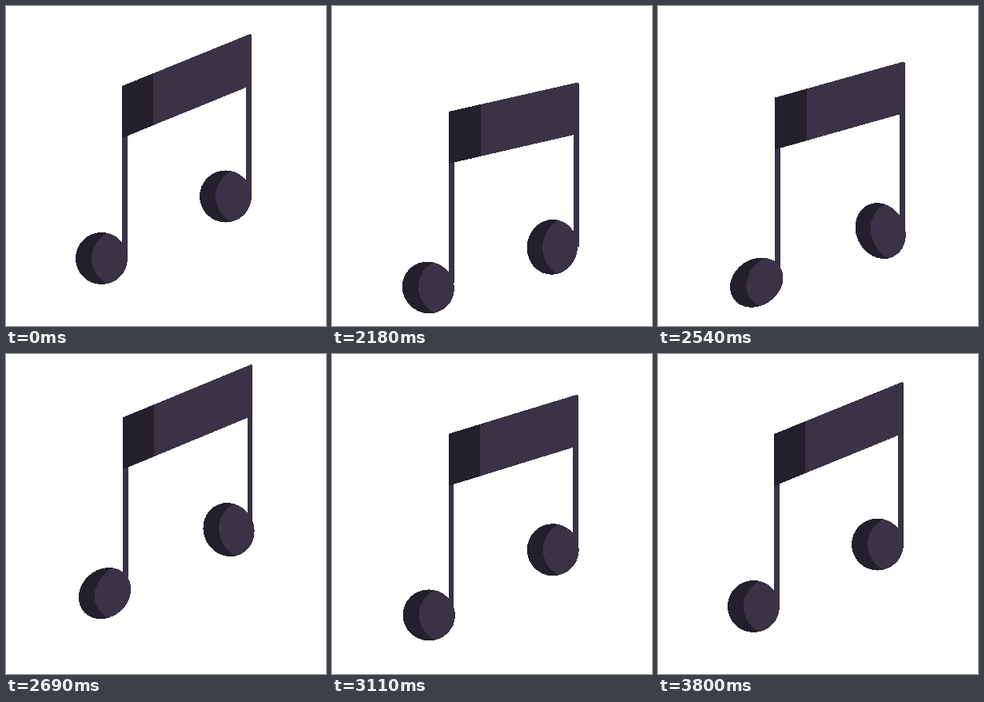
An HTML page that plays this animation: 400 px wide and 400 px high, repeating every 3830 ms.

```html
<!DOCTYPE html>
<html>
<head>
<meta charset="utf-8">
<style>
html, body { margin: 0; height: 100%; overflow: hidden; background: #fff; }
svg { display: block; width: 400px; height: 400px; fill: #393345; }
.dark { fill: #231f2b; }
</style>
</head>
<body>
<svg viewBox="0 0 400 400" shape-rendering="crispEdges">
  <defs>
    <g id="ball">
      <circle class="dark" r="32.5"/>
      <path d="M7.5-31.6A35 35 0 0 0 7.5 31.6A32.5 32.5 0 0 0 7.5-31.6Z"/>
    </g>
  </defs>
  <path id="stems"/>
  <path id="beam"/>
  <path id="shade" class="dark"/>
  <use id="head1" href="#ball"/>
  <use id="head2" href="#ball"/>
</svg>
<script>
const LOOP = 3830, START = 2030, STEP = 30, BOUNCE = 2000;
const STEM = 6.7;
const turns = [0, 250, 400, 720, 1050, 1330, 1650];
const $ = id => document.getElementById(id);
const ease = u => (1 - Math.cos(Math.PI * u)) / 2;

// Fall and hang, fly up, dip, hop, settle; a larger lag makes the part trail behind
const bounce = (lag, fall, fly, dip, hop) => time => {
  const t = time / lag, y = [0, fall, fall, fly, dip, hop, 0];
  const i = turns.findIndex(turn => turn > t);
  if (i < 1) return 0;
  const u = (t - turns[i - 1]) / (turns[i] - turns[i - 1]);
  return y[i - 1] + (y[i] - y[i - 1]) * ease(u);
};

const beamLeft = bounce(1, 39, -22, 1, -10);
const beamRight = bounce(1, 74, -24, 19, -10);
const head1 = bounce(1.07, 48, -26, 11, -4);
const head2 = bounce(1.02, 79, -23, 7, 1);
const sway = bounce(1, 1.9, 1.2, .8, .4);

const speed = (move, t) => (move(t + 5) - move(t - 5)) / 10;

function place(id, x, y, stretch, skew) {
  const wide = 1 - (stretch - 1) * .4;
  $(id).setAttribute('transform', `matrix(${wide} ${skew} ${skew} ${stretch} ${x} ${y})`);
}

function draw(t) {
  const s = sway(t);
  const left = 145.1 + s * .75, right = 307 + s * 1.1, split = 184 + s;
  const yl = 100 + beamLeft(t), yr = 35 + beamRight(t);
  const mid = yl + (yr - yl) * (split - left) / (right - 2 - left);

  // The heads swing sideways once while the note rebounds
  const swing = t > 100 && t < 1280 ? Math.sin(Math.PI * (t - 100) / 1180) : 0;
  const x1 = 119.5 + 4 * swing, x2 = 274.5 + 4 * swing;
  const y1 = 315.5 + head1(t), y2 = 238 + head2(t);
  const v1 = speed(head1, t), v2 = speed(head2, t);
  const trail = head1(t) - beamLeft(t);
  const low = y1 - 2 - 18 * swing;

  const set = (id, d) => $(id).setAttribute('d', d);
  set('stems', `M${left} ${yl + 50}h${STEM}V${low}h${-STEM}Z`
    + `M${right} ${yr + 10}V${y2}h${-STEM}V${yr + 10}Z`);
  set('beam', `M${left} ${yl}L${right - 2} ${yr}l2 2V${yr + 64}L${left} ${yl + 65}Z`);
  set('shade', `M${left} ${yl}L${split} ${mid}v65L${left} ${yl + 65}Z`);
  place('head1', x1, y1, 1 - .0033 * trail * swing, .35 * v1 * swing);
  place('head2', x2, y2, 1 + .155 * Math.abs(v2), -.16 * v2 * swing);
}

const begin = performance.now();
function tick() {
  const t = (performance.now() - begin) % LOOP;
  draw(t < START ? 0 : START + Math.floor((t - START) / STEP) * STEP - BOUNCE);
  requestAnimationFrame(tick);
}
tick();
</script>
</body>
</html>
```
